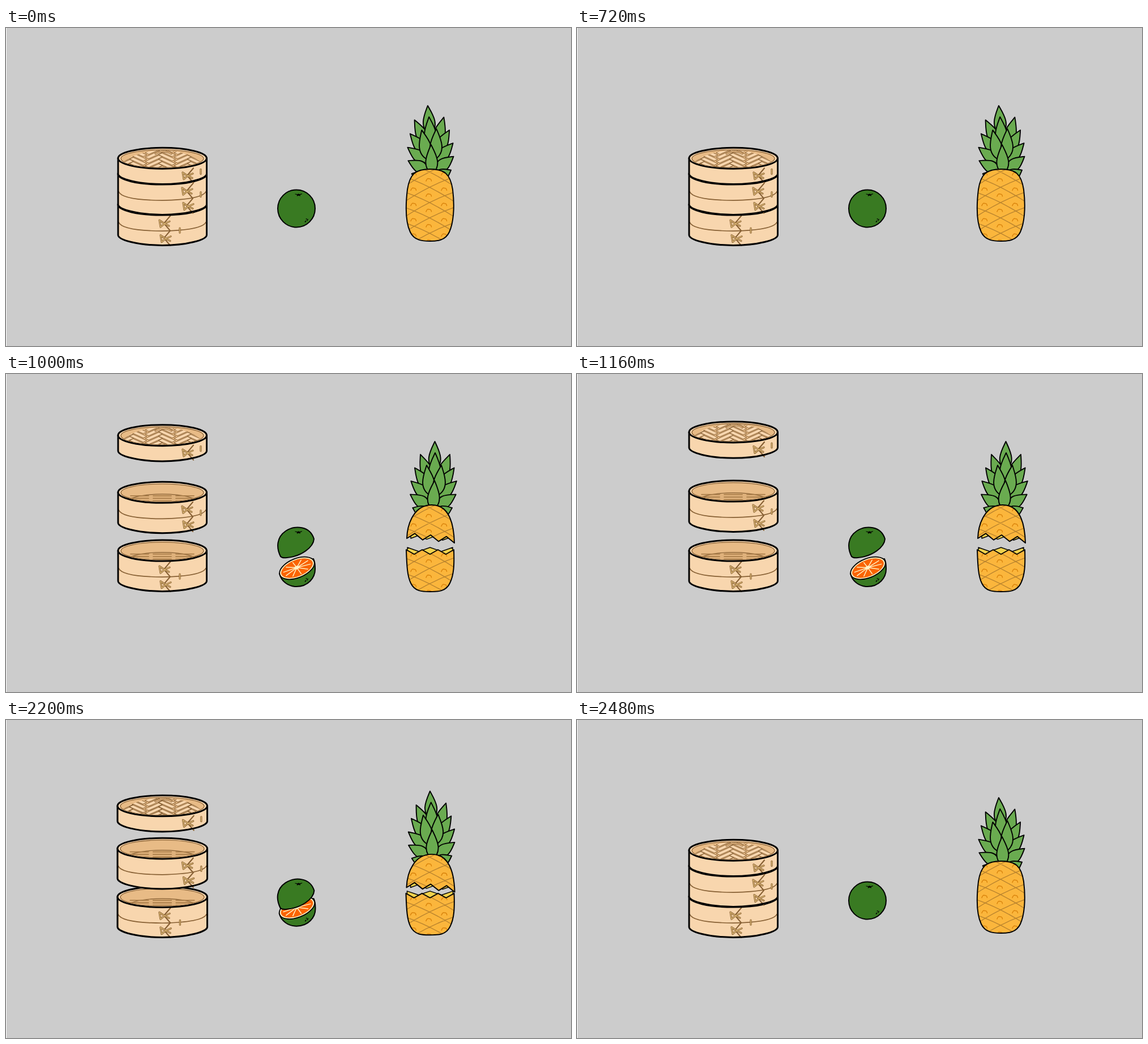
An HTML page that plays this animation: 998 px wide and 561 px high, repeating every 2520 ms.

```html
<!DOCTYPE html>
<html lang="en">
<head>
<meta charset="utf-8">
<title>Opening things</title>
<style>
html, body { margin: 0; width: 100%; height: 100%; overflow: hidden; background: #ccc; }
svg { display: block; width: 100vw; height: 100vh; }
</style>
</head>
<body>
<svg id="stage" viewBox="0 0 998 561" stroke-linejoin="round" stroke-linecap="round"></svg>
<script>
const LOOP = 2520, STEP = 40, CLOSING = 1965;
const INK = '#000', WOOD = '#f8d6ae', TAN = '#e8bb86', BROWN = '#876034', CORD = '#d3ae6d';
const LEAF = '#6aab50', SKIN = '#fbb63c', FLESH = '#f0d24d', LIME = '#397a22', CREAM = '#fff0c4';

const path = (d, fill, stroke = 'none', width = 0, more = '') =>
  `<path d="${d}" fill="${fill}" stroke="${stroke}" stroke-width="${width}" ${more}/>`;
const line = (d, color, width) => path(d, 'none', color, width);
const group = (id, body) => `<g id="${id}">${body}</g>`;
const clip = (id, d) => `<clipPath id="${id}"><path d="${d}"/></clipPath>`;
const within = (id, body) => `<g clip-path="url(#${id})">${body}</g>`;
const ellipse = (x, y, rx, ry, fill, stroke = 'none', width = 0) =>
  `<ellipse cx="${x}" cy="${y}" rx="${rx}" ry="${ry}" fill="${fill}" stroke="${stroke}" stroke-width="${width}"/>`;
const cord = (d, color = CORD) => line(d, BROWN, 3.2) + line(d, color, 1.6);

// Steamer: each tier is drawn around the centre line of its rim.
const TIER = 53.3, LID = 27.3, RIM_Y = 311.6;
const HOLLOW = 'M203 .5A73 15.5 0 0 1 349 .5A73 15.5 0 0 1 203 .5Z';
const DOME = 'M205 8Q232 -13 276 -14Q320 -13 343 6Q320 18 276 18Q229 18 205 8Z';

const bow = (x, y) => cord(`M${x - 9} ${y - 6}L${x} ${y}L${x - 7} ${y + 6}ZM${x + 9} ${y - 4}L${x} ${y}L${x + 8} ${y + 4}`);
const pin = (x, y) => cord(`M${x} ${y - 4}v8`);

function lacing(x, y, count) {
  let edge = `M${x} ${y}`, bows = '';
  for (let k = 0; k < count; k++) {
    edge += 'l-11 13l11 13';
    bows += bow(x - 10 + 2 * k, y + 13.5 + 26.5 * k);
  }
  return line(edge, BROWN, 2.2) + bows;
}

// Herringbone of three-cell strips, seen at a slant.
function weave() {
  let d = '';
  for (let u = -9; u < 14; u++) {
    for (let v = -9; v < 14; v++) {
      const phase = ((u - v) % 6 + 6) % 6;
      if (phase === 0) d += `M${u} ${v + .12}h2.8v.76h-2.8z`;
      if (phase === 5) d += `M${u + .12} ${v}v2.8h.76v-2.8z`;
    }
  }
  const strips = path(d, WOOD, BROWN, 1, 'transform="matrix(8.5 3.8 -8.5 3.8 277 -17)" vector-effect="non-scaling-stroke"');
  return within('hollow', within('dome', strips)) + cord('M264 -8Q278 -16 292 -8', TAN);
}

function slats() {
  let bars = '';
  for (let row = 0; row < 3; row++)
    for (let col = -1; col < 2; col++)
      bars += `M${260 + col * 40} ${6 + row * 4.5}h32`;
  return within('hollow', ellipse(276, 20, 66, 17, '#dfb17b', BROWN, 1.2) + line(bars, '#a97d49', 1.8));
}

function tier(id, height, inside, trim) {
  const wall = `M198 0V${height}C198 ${height + 9} 233 ${height + 18.5} 276 ${height + 18.5}S354.5 ${height + 9} 354.5 ${height}V0Z`;
  return group(id, path(wall, WOOD) + trim + line(wall, INK, 3) +
    ellipse(276.2, 0, 78.2, 18.5, WOOD, INK, 3) + path(HOLLOW, TAN, BROWN, 1.3) + inside);
}

const band = line('M199 31Q205 46 276 46.5Q346 45 353 31', BROWN, 1.7);
const steamer = group('steamer',
  tier('base', TIER, slats(), band + lacing(290, 20, 2) + pin(307, 45.5)) +
  tier('middle', TIER, slats(), band + lacing(330, 17, 2) + pin(344, 36)) +
  tier('lid', LID, weave(), lacing(331, 17.5, 1) + pin(344, 23.5)));

// Citrus
const stem = y => path(`M511 ${y - 1}l4 .5l2 -1l1 1l5 -1l-4 2l.5 1.8l-2.5 -1l-3 1l.5 -1.8z`, INK, INK, .6);
const pores = y => line(`M528.5 ${y}l1 -1.5m2.5 -1l1 -2m-2.5 -.5l.2 -.3`, INK, 1.6);

function citrusFace() {
  let rays = '';
  for (let i = 0; i < 10; i++) {
    const a = (i + .3) * Math.PI / 5;
    rays += `M0 -1L${25 * Math.cos(a)} ${12 * Math.sin(a)}`;
  }
  return `<g transform="translate(514 342.5) rotate(-22)">` +
    ellipse(0, 0, 32.5, 16.8, CREAM, INK, 1.8) + ellipse(0, 0, 29.5, 14.2, '#fa6400') +
    line(rays, CREAM, 1.5) + ellipse(0, -1, 4, 3, CREAM) + '</g>';
}

const citrus = group('citrus',
  group('citrusWhole', ellipse(513, 318.5, 33, 33, LIME, INK, 2) + stem(294) + pores(342)) +
  group('citrusCut',
    group('citrusLow', path('M483 352C486 366 499 375 513 375C533 375 547 360 546 342C546 335 545 330 543 326Z', LIME, INK, 2) +
      citrusFace() + pores(366)) +
    group('citrusTop', path('M485 322C477 306 478 288 494 277C511 266 537 268 544 291C543 306 521 322 496 324Q488 325 485 322Z', LIME, INK, 2) +
      stem(279))));

// Pineapple
function zigzag(x0, x1, count, y0, y1, height) {
  const points = [];
  for (let k = 0; k <= count; k++)
    points.push(`${x0 + (x1 - x0) * k / count} ${y0 + (y1 - y0) * k / count + (k % 2) * height}`);
  return points.join('L');
}
const BODY = 'M749 249C775 249 785 258 789 285C793 318 790 345 783 360C776 375 762 376 749 376C736 376 721 375 714 360C707 345 705 318 709 285C713 258 723 249 749 249Z';
const TOP = `M${zigzag(708, 792, 6, 290, 298, -10)}C791 262 782 231 752 231C722 231 709 262 708 290Z`;
const LOW = `M${zigzag(707, 791, 6, 310, 310, 8)}C792 337 791 355 784 369C777 384 763 384 749 384C736 384 722 384 715 369C709 357 708 340 707 310Z`;
const TOP_FLESH = `M${zigzag(715, 785, 5, 290, 294, -6)}V270H715Z`;
const LOW_FLESH = `M${zigzag(709, 789, 4, 306, 306, 7)}V324H709Z`;

function rind(shift) {
  let lines = '', marks = '';
  const mark = (x, y) => marks += `M${x - 5} ${y + 2.5}q2 -5.5 5 -4q4 -.5 4.5 4`;
  for (let k = -2; k < 6; k++) {
    const y = 281 + 27 * k;
    lines += `M700 ${y - 20}Q748 ${y - 4} 796 ${y + 28}M796 ${y - 20}Q748 ${y - 4} 700 ${y + 28}`;
    mark(747, y - 13.5);
    mark(720, y + 3);
    mark(774, y + 3);
  }
  return `<g transform="translate(0 ${shift})">${line(lines, '#ba842e', 1.4)}${line(marks, '#dc870f', 1.6)}</g>`;
}
const fruit = (id, d, shift) =>
  clip(id + 'Clip', d) + path(d, SKIN) + within(id + 'Clip', rind(shift)) + line(d, INK, 2);

function leaf(tx, ty, bx, by) {
  const dx = bx - tx, dy = by - ty, w = 13 / Math.hypot(dx, dy);
  const at = (along, out) => `${tx + dx * along - dy * w * out} ${ty + dy * along + dx * w * out}`;
  return path(`M${tx} ${ty}C${at(.3, .55)} ${at(.72, 1.5)} ${bx} ${by}C${at(.72, -1.5)} ${at(.3, -.55)} ${tx} ${ty}Z`, LEAF, INK, 1.9);
}
function crown() {
  const pair = (x, y, spread, foot, base) => leaf(x - spread, y, x - foot, base) + leaf(x + spread, y, x + foot, base);
  let leaves = leaf(757.5, 119, 757, 170);
  for (let i = 0; i < 5; i++)
    leaves += pair(758 - 1.2 * i, 142 + 23.5 * i, 26 + 15 * Math.sin(i * Math.PI / 5), 7, 192 + 14 * i);
  return leaves + leaf(758, 139, 757, 192) + pair(756, 161, 13, 7, 214) + leaf(757, 188, 754, 240);
}
const pineapple = group('pineapple',
  group('crown', crown()) +
  group('pineWhole', fruit('whole', BODY, 0)) +
  group('pineCut',
    group('pineLow', path(LOW_FLESH, FLESH, INK, 1.5) + fruit('low', LOW, 8)) +
    group('pineTop', path(TOP_FLESH, FLESH, INK, 1.5) + fruit('top', TOP, -18))));

const burst = (x, y, r, ...ends) => ends.map(([dx, dy]) => ({ x, y, r, dx, dy }));
const specks = [
  ...burst(513, 320, 2, [-65, 4], [-39, -6], [-38, 43]),
  ...burst(750, 300, 2.7, [-71, -6], [-68, 19], [66, 12])
];

const stage = document.getElementById('stage');
stage.innerHTML = clip('hollow', HOLLOW) + clip('dome', DOME) +
  '<rect width="998" height="561" fill="#ccc"/><rect width="1" height="561" fill="#fff"/>' +
  specks.map((_, i) => `<circle id="speck${i}" fill="#fff"/>`).join('') +
  steamer + citrus + pineapple;

const el = {};
stage.querySelectorAll('[id]').forEach(node => el[node.id] = node);

const ramp = (t, from, to) => Math.min(1, Math.max(0, (t - from) / (to - from)));
const easeOut = x => 1 - (1 - x) ** 3;
const bump = (t, from, to) => Math.sin(Math.PI * ramp(t, from, to));
// 0 is closed, 1 is open: a quick ease out, a hold, then an accelerating return.
const openness = (t, from, to, shut, power = 2) =>
  t < CLOSING ? easeOut(ramp(t, from, to)) : 1 - ramp(t, CLOSING, shut) ** power;

const place = (id, value) => el[id].setAttribute('transform', value);
const shift = (id, y) => place(id, `translate(0 ${y})`);
const scale = (id, x, y, sx, sy) => place(id, `translate(${x} ${y}) scale(${sx} ${sy}) translate(${-x} ${-y})`);
const show = (id, on) => el[id].setAttribute('display', on ? 'inline' : 'none');

function draw(t) {
  const squash = .026 * bump(t, 480, 720) + .013 * bump(t, 2080, 2320) + .024 * bump(t, 2320, 2480);
  const sx = 1 + squash, sy = 1 - squash / 2 + .065 * bump(t, 750, 910);

  const lift = openness(t, 772, 1125, 2350);
  scale('steamer', 276, 384, sx, 1 - squash / 2);
  shift('base', RIM_Y);
  shift('middle', RIM_Y - 54 - 51 * lift);
  shift('lid', RIM_Y - 81.8 - 127.3 * lift);

  const citrusOpen = t >= 760 && t < 2290;
  show('citrusWhole', !citrusOpen);
  show('citrusCut', citrusOpen);
  shift('citrusTop', 15 * (1 - openness(t, 730, 840, 2290, 1.3)));
  shift('citrusLow', -24 * (1 - openness(t, 730, 840, 2290, 2.4)));
  scale('citrus', 513, citrusOpen ? 322 : 318.5, sx, sy);

  const pineOpen = t >= 760 && t < 2330;
  const drop = 18 * (1 - openness(t, 730, 840, 2330, 2.7));
  const lean = 1 - openness(t, 730, 840, 2250);
  show('pineWhole', !pineOpen);
  show('pineCut', pineOpen);
  shift('pineTop', drop);
  shift('pineLow', -8 * (1 - openness(t, 730, 840, 2330, 1.5)));
  place('crown', `translate(${-1.8 * lean} ${drop}) rotate(${-5.3 * lean} 752 236)`);
  scale('pineapple', 749, pineOpen ? 297 : 376, sx, sy);

  const fly = easeOut(ramp(t, 740, 980));
  const size = t < 760 ? 0 : 1 - ramp(t, 880, 980);
  specks.forEach(({ x, y, r, dx, dy }, i) => {
    const dot = el['speck' + i];
    dot.setAttribute('cx', x + dx * fly);
    dot.setAttribute('cy', y + dy * fly);
    dot.setAttribute('r', r * size);
  });
}

const start = performance.now();
function tick() {
  const t = (performance.now() - start) % LOOP;
  draw(Math.floor(t / STEP) * STEP);
  requestAnimationFrame(tick);
}
tick();
</script>
</body>
</html>
```
